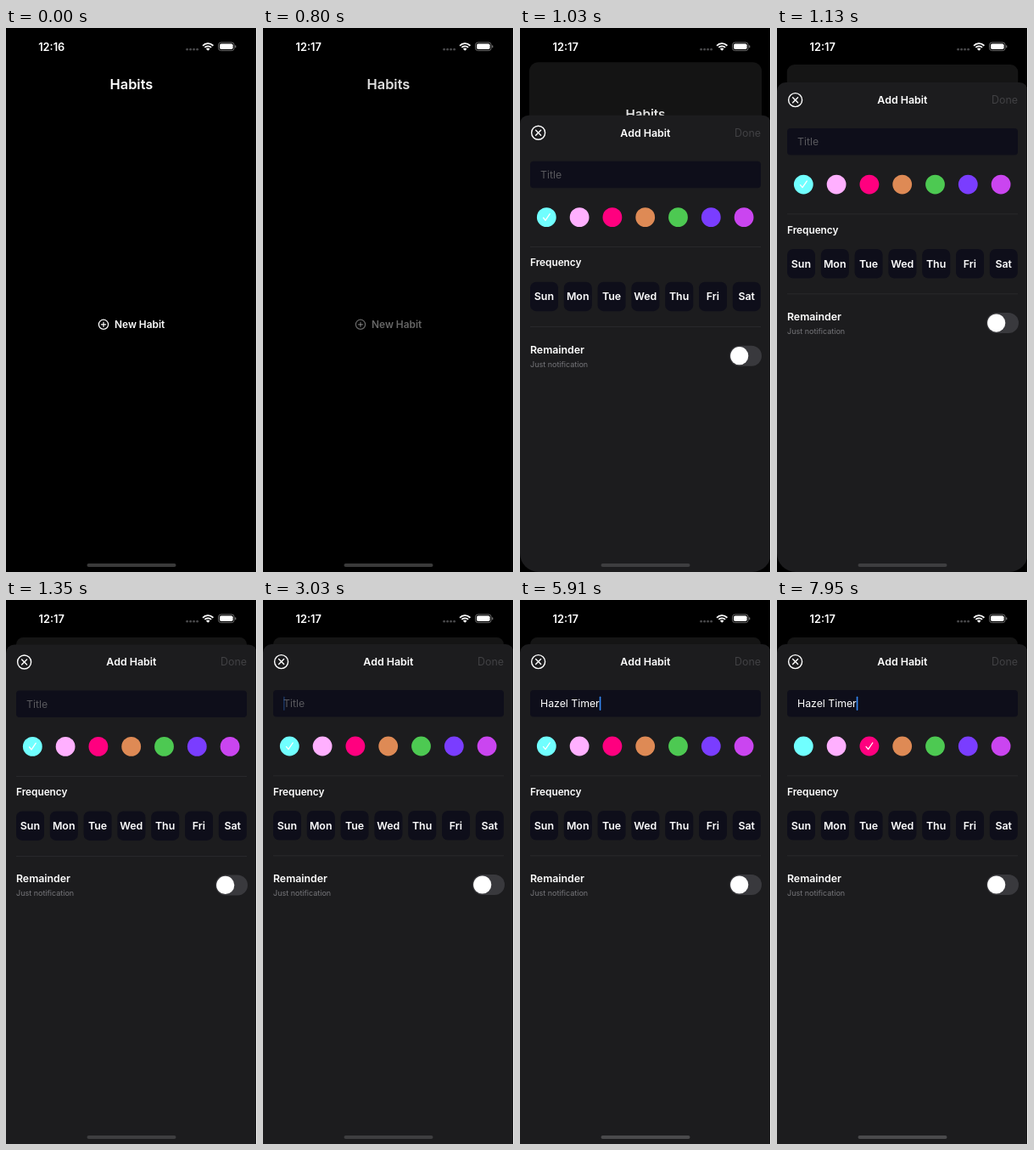
Write an HTML page with a canvas that moves like this. It is 296 px wide and 640 px high and loops after 8000 ms.

```html
<!DOCTYPE html>
<html lang="en">
<head>
<meta charset="utf-8">
<title>Habits</title>
<style>
  html, body { margin: 0; width: 100%; height: 100%; overflow: hidden; background: #000; }
  canvas { display: block; width: 296px; height: 640px; }
</style>
</head>
<body>
<canvas id="stage"></canvas>
<script>
const W = 296, H = 640, LOOP = 8000, MID = 147.9;
const canvas = document.getElementById('stage');
const ctx = canvas.getContext('2d');
const ratio = window.devicePixelRatio || 1;
canvas.width = W * ratio;
canvas.height = H * ratio;

const SHEET = '#1c1c1e', FIELD = '#0e0e1a', WHITE = '#fff';
const SWATCHES = ['#70ffff', '#ffb0ff', '#ff007f', '#de8a55', '#4dc952', '#7a3dff', '#ca45f0'];
const DAYS = ['Sun', 'Mon', 'Tue', 'Wed', 'Thu', 'Fri', 'Sat'];
const TITLE = 'Hazel Timer';

// Each entry: [start in ms, value held until the next entry]
const TYPED = [[0, 0], [3260, 1], [3420, 3], [3630, 4], [3790, 5], [4520, 6],
  [5350, 7], [5580, 9], [5760, 10], [5910, 11]];
const CARET = [[0, 0], [3030, 0.3], [3150, 1], [7030, 0], [7270, 0.5], [7380, 1]];
const PICKED = [[0, 0], [7600, 0.25], [7720, 0.5], [7830, 0.8], [7950, 1]];
const SLIDE = [920, 1030, 1130, 1240, 1350, 2130].map(t => [t, t]);

const held = (steps, t) => steps.reduce((v, [at, value]) => t >= at ? value : v, 0);

// Share of the sheet's travel still left, critically damped
function remaining(t) {
  const x = 0.0173 * (t - 794.4);
  return (1 + x) * Math.exp(-x);
}

function faded(alpha, draw) {
  ctx.save();
  ctx.globalAlpha *= alpha;
  draw();
  ctx.restore();
}

function text(str, x, y, size, weight = 400, color = WHITE, align = 'left') {
  ctx.font = `${weight} ${size}px Inter, sans-serif`;
  ctx.fillStyle = color;
  ctx.textAlign = align;
  ctx.textBaseline = 'alphabetic';
  ctx.fillText(str, x, y + size * 0.36);
}

function box(x, y, w, h, r, color) {
  ctx.fillStyle = color;
  ctx.beginPath();
  ctx.roundRect(x, y, w, h, r);
  ctx.fill();
}

function disc(x, y, r, color) {
  ctx.fillStyle = color;
  ctx.beginPath();
  ctx.arc(x, y, r, 0, Math.PI * 2);
  ctx.fill();
}

function ring(x, y, r, width) {
  ctx.strokeStyle = WHITE;
  ctx.lineWidth = width;
  ctx.beginPath();
  ctx.arc(x, y, r, 0, Math.PI * 2);
  ctx.stroke();
}

function line(points, width, color = WHITE) {
  ctx.strokeStyle = color;
  ctx.lineWidth = width;
  ctx.lineCap = ctx.lineJoin = 'round';
  ctx.beginPath();
  points.forEach(([x, y]) => ctx.lineTo(x, y));
  ctx.stroke();
}

function statusBar(t) {
  text(t < 500 ? '12:16' : '12:17', 53.7, 22, 12.8, 600, WHITE, 'center');
  for (let i = 0; i < 4; i++) disc(213.6 + i * 4, 25.2, 1.4, '#48484a');

  ctx.strokeStyle = WHITE;
  ctx.lineCap = 'butt';
  ctx.lineWidth = 1.8;
  for (const r of [8.4, 5.3]) {
    ctx.beginPath();
    ctx.arc(238.2, 26.6, r, -Math.PI * 0.76, -Math.PI * 0.24);
    ctx.stroke();
  }
  ctx.fillStyle = WHITE;
  ctx.beginPath();
  ctx.moveTo(238.2, 26.8);
  ctx.arc(238.2, 26.8, 3.2, -Math.PI * 0.76, -Math.PI * 0.24);
  ctx.fill();

  ctx.strokeStyle = '#777';
  ctx.lineWidth = 0.9;
  ctx.beginPath();
  ctx.roundRect(250.5, 17, 18.6, 9.6, 3);
  ctx.stroke();
  box(252, 18.5, 15.6, 6.6, 1.8, WHITE);
  box(270.1, 20.3, 1.2, 3, 0.6, '#777');
}

// Cut-out of the device's notch, flared where it meets the top edge
function notch(depth) {
  ctx.fillStyle = '#000';
  ctx.beginPath();
  ctx.moveTo(92, -1);
  ctx.lineTo(92, 0);
  ctx.quadraticCurveTo(98, 0, 98, depth / 2);
  ctx.quadraticCurveTo(98, depth, 107, depth);
  ctx.lineTo(W - 107, depth);
  ctx.quadraticCurveTo(W - 98, depth, W - 98, depth / 2);
  ctx.quadraticCurveTo(W - 98, 0, W - 92, 0);
  ctx.lineTo(W - 92, -1);
  ctx.fill();
}

function homeScreen(t, p) {
  const scale = 1 - 0.081 * p;
  ctx.save();
  ctx.translate(W / 2, 44 * p);
  ctx.scale(scale, scale);
  ctx.translate(-W / 2, 0);
  if (p > 0) {
    const level = Math.round(21 * Math.sqrt(p));
    box(0, 0, W, H, 9 + 30 * (1 - p), `rgb(${level},${level},${level})`);
    const depth = 22 * (1 - p);
    if (depth > 2) notch(depth);
  }
  faded(t < 800 ? 1 : 0.88, () => text('Habits', MID, 66, 16.4, 600, WHITE, 'center'));
  faded(t < 500 ? 1 : 0.4, () => {
    ring(115, 348.8, 5.6, 1.3);
    line([[112.3, 348.8], [117.7, 348.8]], 1.2);
    line([[115, 346.1], [115, 351.5]], 1.2);
    text('New Habit', 128, 348.8, 11.9, 600);
  });
  ctx.restore();
}

function checkMark(x, y, alpha) {
  faded(alpha, () => line([[x - 3.8, y + 0.6], [x - 1.3, y + 3.6], [x + 3.9, y - 4]], 1.3));
}

function titleField(t) {
  box(12, 106, 272, 31.5, 4, FIELD);
  const typed = TITLE.slice(0, held(TYPED, t));
  if (typed) text(typed, 24, 122, 12.3);
  else text('Title', 24, 122, 12.3, 400, '#58585d');
  const width = typed ? ctx.measureText(typed).width : 0;
  faded(held(CARET, t), () => box(24 + width, 113.5, 1.6, 16.5, 0.8, '#3489f5'));
}

function sheet(t, offset) {
  ctx.save();
  ctx.translate(0, offset);
  const base = offset > 2 && offset < 60 ? 22 : 0;
  box(0, 52, W, H - 52 - offset, [10, 10, base, base], SHEET);

  ring(21.6, 72.6, 8, 1.4);
  line([[18.6, 69.6], [24.6, 75.6]], 1.4);
  line([[24.6, 69.6], [18.6, 75.6]], 1.4);
  text('Add Habit', MID, 72.5, 12.4, 600, WHITE, 'center');
  text('Done', 284, 72.5, 12.4, 400, '#414144', 'right');

  titleField(t);

  SWATCHES.forEach((color, i) => disc(31.3 + i * 38.8, 172, 11.4, color));
  const picked = held(PICKED, t);
  checkMark(31.3, 172, 1 - picked);
  checkMark(108.9, 172, picked);

  for (const y of [206.5, 300.5]) box(12, y, 272, 0.8, 0, '#2c2c2f');
  text('Frequency', 12, 225.3, 11.8, 600);
  DAYS.forEach((day, i) => {
    const x = 12 + i * 39.8;
    box(x, 248, 33, 34.5, 7, FIELD);
    text(day, x + 16.4, 265.3, 12.4, 600, WHITE, 'center');
  });

  text('Remainder', 12, 327.6, 12.3, 600);
  text('Just notification', 12, 344.6, 9, 400, '#77777b');
  box(247, 323, 38, 24, 12, '#39393d');
  disc(258.7, 335, 10.6, WHITE);
  ctx.restore();
}

function render(t) {
  ctx.setTransform(ratio, 0, 0, ratio, 0, 0);
  ctx.fillStyle = '#000';
  ctx.fillRect(0, 0, W, H);

  const moved = held(SLIDE, t);
  const left = moved ? remaining(moved) : 1;
  homeScreen(t, 1 - left);
  if (moved) sheet(t, 588 * left);
  statusBar(t);
  box(95.5, 630, 105, 4, 2, t < 920 ? '#3a3a3a' : t < 4290 ? '#3e3e40' : '#4a4a4c');
  box(W - 1, 0, 1, H, 0, WHITE);
}

const start = performance.now();
function loop() {
  render((performance.now() - start) % LOOP);
  requestAnimationFrame(loop);
}
loop();
</script>
</body>
</html>
```
